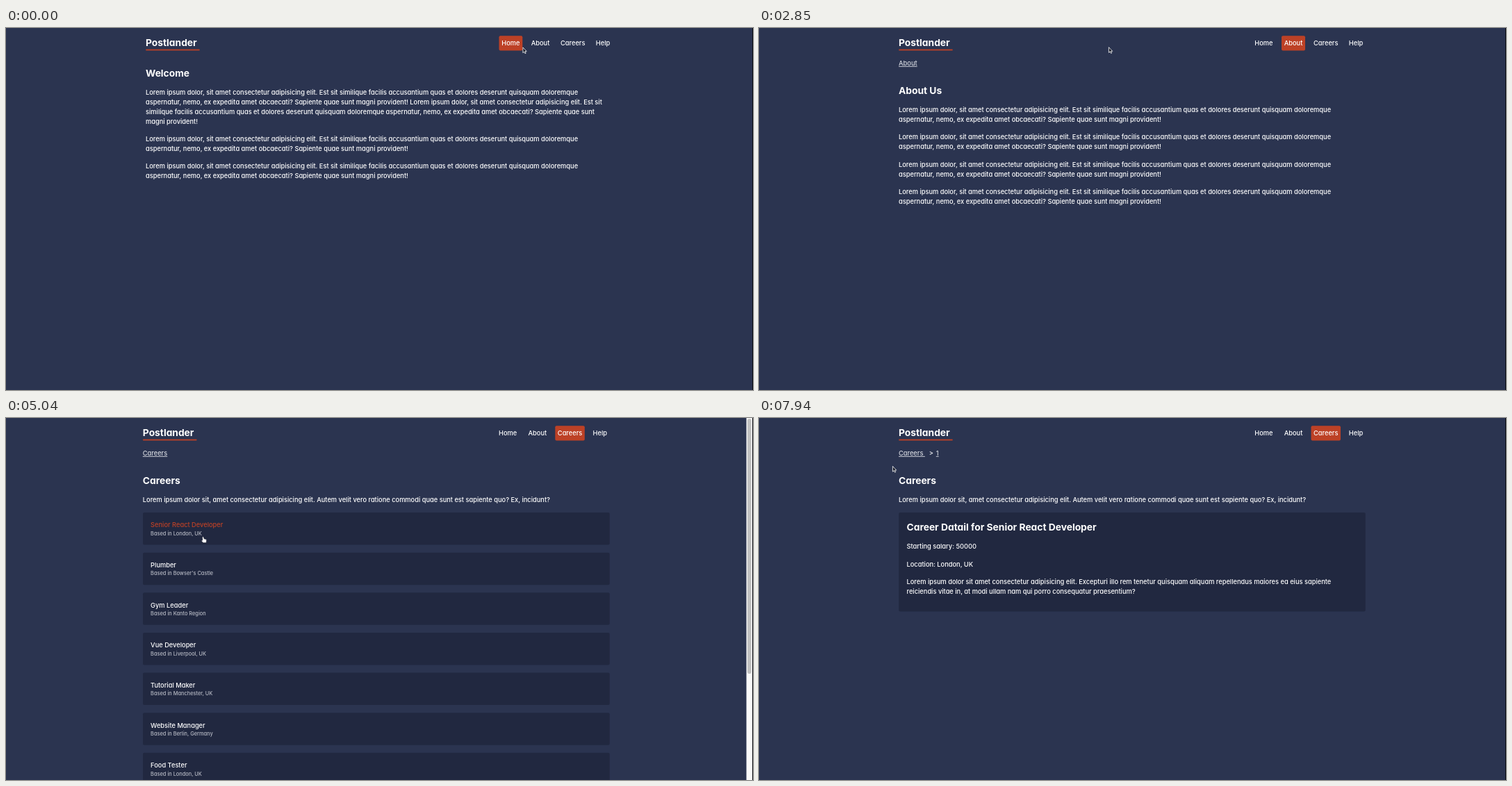
These frames come from a looping animation (1075x521 px, 8000 ms). An HTML page:

```html
<!DOCTYPE html>
<html lang="en">
<head>
<meta charset="utf-8">
<title>Router demo</title>
<style>
  html, body { margin: 0; width: 100%; height: 100%; overflow: hidden; background: #2b3450; }
  svg { display: block; width: 1075px; height: 521px; }
  text { font: 500 9.27px Inter, "Open Sans", sans-serif; font-feature-settings: "cv11"; fill: #fff; white-space: pre; }
  .big { font-size: 13.8px; font-weight: 700; }
  .nav { text-anchor: middle; }
  .crumb { fill: #d3d6dd; text-decoration: underline; text-decoration-thickness: .7px; }
  .small { font-size: 7.4px; fill: #b6b9c3; }
  .card { fill: #212840; }
  .accent { fill: #bd4126; }
</style>
</head>
<body>
<svg viewBox="0 0 1075 521">
  <rect width="1075" height="521" fill="#2b3450"/>
  <g id="pages"></g>
  <rect x="1074" width="1" height="521" fill="#05070c"/>
  <g id="pointer">
    <path id="arrow" d="M.4.4V8.2L2.2 6.6 3.5 9.3 4.7 8.7 3.5 6.1H5.7Z" fill="#1a1d28" stroke="#fff" stroke-width=".8"/>
    <path id="hand" d="M-1.4.9Q-.6-.1.2.9L1.3 3.6 3.7 4.1Q4.7 4.4 4.6 5.5L4.1 9.2H-.2L-2.6 6.7Q-2.7 5.4-1.2 5.7Z" fill="#fff" stroke="#1a1d28" stroke-width=".5"/>
  </g>
</svg>
<script>
const LOOP = 8000;
const $ = id => document.getElementById(id);

function add(parent, tag, attrs, content = '') {
  const node = document.createElementNS('http://www.w3.org/2000/svg', tag);
  for (const key in attrs) node.setAttribute(key, attrs[key]);
  node.textContent = content;
  return parent.appendChild(node);
}
const text = (g, x, y, content, cls = '') => add(g, 'text', { x, y, class: cls }, content);
const box = (g, x, y, width, height, cls) => add(g, 'rect', { x, y, width, height, rx: 2, class: cls });

const LOREM = ['Lorem ipsum dolor, sit amet consectetur adipisicing elit. Est sit similique facilis accusantium quas et dolores deserunt quisquam doloremque',
  'aspernatur, nemo, ex expedita amet obcaecati? Sapiente quae sunt magni provident!'];
const INTRO = 'Lorem ipsum dolor sit, amet consectetur adipisicing elit. Autem velit vero ratione commodi quae sunt est sapiente quo? Ex, incidunt?';
const LINKS = [
  { label: 'Home', x: 709.5, w: 33.8 },
  { label: 'About', x: 752, w: 34 },
  { label: 'Careers', x: 794.5, w: 42.5 },
  { label: 'Help', x: 845.5, w: 27 }
];
const JOBS = [
  ['Senior React Developer', 'London, UK'], ['Plumber', "Bowser's Castle"],
  ['Gym Leader', 'Kanto Region'], ['Vue Developer', 'Liverpool, UK'],
  ['Tutorial Maker', 'Manchester, UK'], ['Website Manager', 'Berlin, Germany'],
  ['Food Tester', 'London, UK']
];

function makePage(active, shift = 0) {
  const g = add($('pages'), 'g', { transform: `translate(${shift})` });
  text(g, 201, 26, 'Postlander', 'big');
  add(g, 'rect', { x: 201.3, y: 30.6, width: 77.3, height: 1.8, class: 'accent' });
  for (const { label, x, w } of LINKS) {
    if (label === active) box(g, x, 11.3, w, 21.2, 'accent');
    text(g, x + w / 2, 24.8, label, 'nav');
  }
  return g;
}
const paragraph = (g, x, y, lines) => lines.forEach((line, i) => text(g, x, y + 14 * i, line));

function homePage() {
  const g = makePage('Home');
  text(g, 201, 69.6, 'Welcome', 'big');
  paragraph(g, 201, 95.9, [LOREM[0],
    LOREM[1] + ' Lorem ipsum dolor, sit amet consectetur adipisicing elit. Est sit',
    'similique facilis accusantium quas et dolores deserunt quisquam doloremque aspernatur, nemo, ex expedita amet obcaecati? Sapiente quae sunt',
    'magni provident!']);
  for (const y of [163.1, 202.2]) paragraph(g, 201, y, LOREM);
  return g;
}

function aboutPage() {
  const g = makePage('About');
  text(g, 201, 53.9, 'About', 'crumb');
  text(g, 201, 94.8, 'About Us', 'big');
  for (let i = 0; i < 4; i++) paragraph(g, 201, 121.2 + 39.2 * i, LOREM);
  return g;
}

function careersPage(shift) {
  const g = makePage('Careers', shift);
  text(g, 201, 94.8, 'Careers', 'big');
  text(g, 201, 121.2, INTRO);
  return g;
}

let firstJob;
function listPage() {
  const g = careersPage(-4.2);
  text(g, 201, 53.9, 'Careers', 'crumb');
  JOBS.forEach(([title, place], i) => {
    const y = 136 + 57.63 * i;
    box(g, 201.2, y, 671.7, 46.6, 'card');
    const heading = text(g, 212.3, y + 21.4, title);
    firstJob ??= heading;
    text(g, 212.3, y + 32.8, 'Based in ' + place, 'small');
  });
  add(g, 'rect', { x: 1069.7, y: 0, width: 8.5, height: 521, fill: '#fafafa' });
  add(g, 'rect', { x: 1071.2, y: 1, width: 5.6, height: 367, rx: 2.8, fill: '#c1c1c1' });
  return g;
}

function detailPage() {
  const g = careersPage();
  text(g, 201, 53.9, 'Careers\u00a0', 'crumb');
  text(g, 244.8, 53.9, '>');
  text(g, 254.8, 53.9, '1', 'crumb');
  box(g, 201.2, 136, 671.5, 142.6, 'card');
  text(g, 212.5, 162, 'Career Datail for Senior React Developer', 'big');
  text(g, 212.5, 188.3, 'Starting salary: 50000');
  text(g, 212.5, 213.5, 'Location: London, UK');
  paragraph(g, 212.5, 238.7, [
    'Lorem ipsum dolor sit amet consectetur adipisicing elit. Excepturi illo rem tenetur quisquam aliquam repellendus maiores ea eius sapiente',
    'reiciendis vitae in, at modi ullam nam qui porro consequatur praesentium?']);
  return g;
}

const pages = [[0, homePage()], [720, aboutPage()], [4130, listPage()], [6560, detailPage()]];

// Each stroke: first step, last step, number of steps, waypoints
const HOME = [743.5, 27.5];
const STROKES = [
  [90, 250, 3, [761, 27]],
  [410, 480, 2, [770.2, 24]],
  [1140, 1220, 2, [771, 21]],
  [1470, 2020, 8, [440, 36], [188.3, 42], [201, 66], [222, 57]],
  [2180, 2260, 2, [224, 54]],
  [2850, 2920, 2, [782, 0.5]],
  [3090, 3470, 6, [845, 15], [822, 20]],
  [4720, 4790, 2, [281, 117]],
  [4970, 5040, 2, [284, 170.4]],
  [5280, 5440, 2, [284, 169]],
  [5760, 5920, 2, [284.4, 164.5]],
  [6080, 6150, 2, [285.2, 161]],
  [7470, 7940, 7, [238, 68], [210, 51], [192, 69]]
];

function pointerAt(t) {
  let from = HOME;
  for (const [first, last, steps, ...points] of STROKES) {
    if (t < first) break;
    const gap = (last - first) / (steps - 1);
    const step = Math.min(steps, 1 + Math.floor((t - first) / gap + 1e-6));
    const path = [from, ...points];
    const along = step / steps * points.length;
    const i = Math.min(points.length - 1, Math.floor(along));
    from = path[i].map((v, axis) => v + (path[i + 1][axis] - v) * (along - i));
  }
  return from;
}

function overLink(x, y, t) {
  const onNav = y > 11.3 && y < 32.5 && LINKS.some(link => x >= link.x && x <= link.x + link.w);
  const onCrumb = x > 201 && x < 238 && y > 44 && y < 58;
  const onCard = t < 7470 && y > 136;
  return onNav || onCrumb || onCard;
}
const show = (node, on) => { node.style.display = on ? '' : 'none'; };

function draw(t) {
  const page = pages.findLast(([time]) => time <= t)[1];
  for (const [, g] of pages) show(g, g === page);
  const [x, y] = pointerAt(t);
  const link = overLink(x, y, t);
  $('pointer').setAttribute('transform', `translate(${x} ${y})`);
  show($('arrow'), !link);
  show($('hand'), link);
  firstJob.classList.toggle('accent', t >= 4970);
}

const start = performance.now();
function tick() {
  draw((performance.now() - start) % LOOP);
  requestAnimationFrame(tick);
}
draw(0);
requestAnimationFrame(tick);
</script>
</body>
</html>
```
